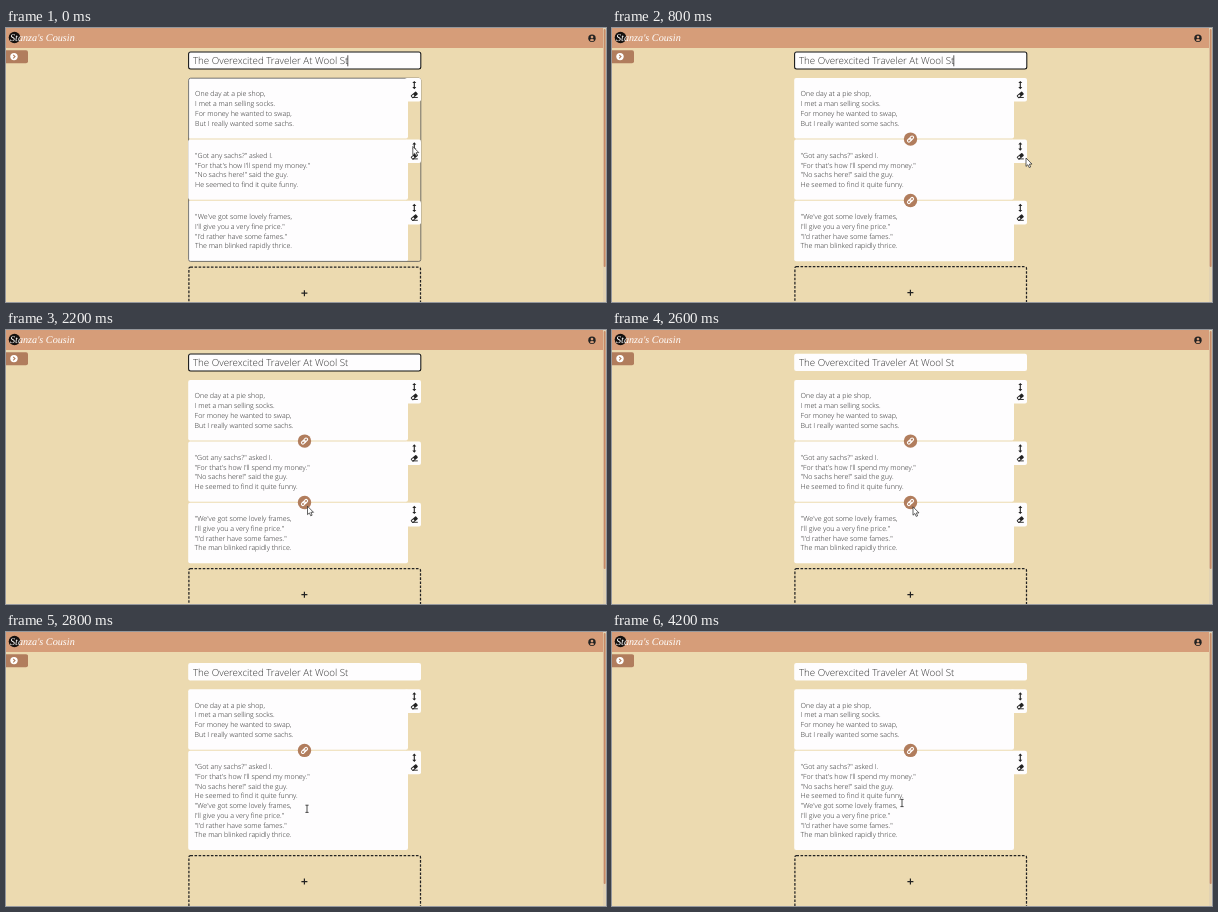
Recreate the animation shown at these times as an HTML page. Size 600 by 274 pixels, loop 4.3 s.

```html
<!DOCTYPE html>
<html lang="en">
<head>
<meta charset="utf-8">
<title>Poem cards</title>
<style>
  html, body { margin: 0; width: 100%; height: 100%; overflow: hidden; background: #ecdab0; }
  svg { display: block; width: 100%; height: 100%; }
  text { font-family: "Open Sans", sans-serif; font-weight: 300; text-rendering: geometricPrecision; white-space: pre; }
  .line { font-size: 7.06px; fill: #262626; }
  .title { font-size: 9.75px; fill: #333; }
  .brand { font: italic 400 10.2px "Liberation Serif", serif; fill: #fff; }
</style>
</head>
<body>
<svg id="stage" viewBox="0 0 600 274" preserveAspectRatio="none"></svg>
<script>
const LOOP = 4300, STEP = 100;
const PAPER = '#fefdfe', SAND = '#ecdab0', CLAY = '#d69d79', BROWN = '#b17d5d', INK = '#222';
const LEFT = 182.2, CARD_W = 219.8, RIGHT = 415, TOP = 57.3, LINE_H = 9.75, GAP = 1;

const poems = [
  ['One day at a pie shop,', 'I met a man selling socks.', 'For money he wanted to swap,', 'But I really wanted some sachs.'],
  ['"Got any sachs?" asked I.', '"For that\'s how I\'ll spend my money."', '"No sachs here!" said the guy.', 'He seemed to find it quite funny.'],
  ['"We\'ve got some lovely frames,', 'I\'ll give you a very fine price."', '"I\'d rather have some fames."', 'The man blinked rapidly thrice.']
];

const rect = (x, y, w, h, fill, more = '') =>
  `<rect x="${x}" y="${y}" width="${w}" height="${h}" fill="${fill}" ${more}/>`;
const group = (x, y, body) => `<g transform="translate(${x} ${y})">${body}</g>`;
const path = (d, stroke, w, more = '') =>
  `<path d="${d}" fill="none" stroke="${stroke}" stroke-width="${w}" ${more}/>`;

const moveIcon = path('M0-3V3', INK, 1.1) +
  `<path d="M-2-2L0-4.2L2-2ZM-2 2L0 4.2L2 2Z" fill="${INK}"/>`;
const eraserIcon = `<g transform="rotate(-40)">${rect(-3.5, -1.8, 7, 3.6, INK, 'rx=".8"')}${rect(-2.7, -.9, 2.2, 1.8, PAPER)}</g>` +
  path('M-1.8 2.6H3.5', INK, .9);
const linkIcon = `<circle r="6.7" fill="${BROWN}"/><g transform="rotate(-45)" fill="none" stroke="#fff" stroke-width="1.1">
  <rect x="-3.7" y="-1.4" width="4.4" height="2.8" rx="1.4"/><rect x="-.7" y="-1.4" width="4.4" height="2.8" rx="1.4"/></g>`;

const cardHeight = lines => lines.length * LINE_H + 21.4;

function card(lines, y, shift) {
  return rect(LEFT, y, CARD_W, cardHeight(lines), PAPER, 'rx="2"') + lines.map((s, i) =>
    `<text class="line" x="${188.6 + shift}" y="${y + 18.4 + i * LINE_H}">${s}</text>`).join('');
}

const tab = y =>
  rect(LEFT + CARD_W - 3, y, RIGHT - LEFT - CARD_W + 3, 23.6, PAPER, 'rx="2"') +
  group(408.3, y + 7.1, moveIcon) + group(408.3, y + 16.9, eraserIcon);

function addBox(y) {
  return rect(182.9, y + .7, 231.6, 52, 'none', `rx="1.5" stroke="${INK}" stroke-width="1.25" stroke-dasharray="2.6 1.5"`) +
    group(298.4, y + 26.7, path('M-3 0H3M0-3V3', INK, 1.2));
}

function stack(id, list, dragging = false) {
  const tops = [];
  let y = TOP;
  for (const lines of list) {
    tops.push(y);
    y += cardHeight(lines) + GAP;
  }
  const cards = list.map((lines, i) => card(lines, tops[i], dragging ? .5 : 0));
  const tabs = tops.map(tab).join('');
  let out;
  if (dragging) {
    // the held card lies above the outline of the drop zone
    const zone = [LEFT + .4, TOP + .2, RIGHT - LEFT - .6, y - TOP - GAP];
    out = rect(...zone, SAND, 'rx="2"') + cards[0] + cards[2] +
      rect(...zone, 'none', 'rx="2" stroke="#555" stroke-width=".8"') + cards[1] + tabs;
  } else {
    out = cards.join('') + tabs + tops.slice(1).map(top => group(298.5, top - .3, linkIcon)).join('');
  }
  return `<g id="${id}">${out}${addBox(y + (dragging ? 4.3 : 3.8))}</g>`;
}

const stage = document.getElementById('stage');
stage.innerHTML = rect(0, 0, 600, 274, SAND) +
  `<g id="page">
    ${rect(LEFT, 31, RIGHT - LEFT, 17.4, PAPER, 'rx="2"')}
    ${rect(LEFT + .4, 31.2, RIGHT - LEFT - .6, 17, 'none', 'id="focus" rx="2" stroke="#111" stroke-width="1.05"')}
    <text class="title" x="187" y="43.8">The Overexcited Traveler At Wool St</text>
    ${path('M341.8 34.6V45.6', '#222', .75, 'id="caret"')}
    ${stack('drag', poems, true)}
    ${stack('three', poems)}
    ${stack('two', poems.slice(0, 2))}
    ${stack('merged', [poems[0], poems[1].concat(poems[2])])}
  </g>` +
  rect(0, 0, 600, 20, CLAY) +
  `<circle cx="8.5" cy="9.5" r="5.8" fill="#15110f"/><text class="brand" x="4" y="13.2">Stanza's Cousin</text>` +
  `<g id="user"><circle r="3.7" fill="${INK}"/><circle cy="-1.1" r="1.35" fill="${CLAY}"/>
    <path d="M-2.2 2.1Q-1.9.7 0 .7T2.2 2.1Q0 3.8-2.2 2.1Z" fill="${CLAY}"/></g>` +
  rect(-3, 22.2, 25, 13, BROWN, 'rx="2"') +
  group(8, 28.6, '<circle r="3.7" fill="#fff"/>' + path('M-.8-1.8L1 0L-.8 1.8', BROWN, 1.1)) +
  `<g id="footer">${rect(0, 255, 600, 19, CLAY)}<circle cx="291.2" cy="266.8" r="6.1" fill="${INK}"/>${rect(304, 261, 11.2, 11.2, INK)}</g>` +
  `<g id="bar">${rect(597, 0, 3, 274, '#e2d2b3')}${rect(597.7, 1, 1.9, 238, '#c58a67', 'id="thumb" rx=".9"')}</g>` +
  `<g id="arrow"><path d="M0 0V8.4L1.9 6.7L3.2 9.6L4.6 9L3.4 6.1H6Z" fill="#fff" stroke="#222" stroke-width=".7"/></g>` +
  `<g id="beam">${path('M-1.6-3.6H1.6M0-3.6V3.6M-1.6 3.6H1.6', '#222', .8)}</g>`;

const el = {};
stage.querySelectorAll('[id]').forEach(e => { el[e.id] = e; });

// time, x, y of the pointer
const track = [
  [0, 406.8, 118.5], [100, 406.8, 118.5], [600, 414, 130], [1100, 414, 130],
  [1600, 307.8, 168.8], [1700, 307.8, 168.8], [2300, 301, 176.8],
  [4100, 301, 176.8], [4200, 290, 171]
];

function pointer(t) {
  const i = track.findIndex(k => k[0] >= t);
  if (i < 1) return track[i < 0 ? track.length - 1 : 0].slice(1);
  const [a, b] = [track[i - 1], track[i]];
  const p = (t - a[0]) / (b[0] - a[0]);
  const e = p * p * (3 - 2 * p);
  return [a[1] + (b[1] - a[1]) * e, a[2] + (b[2] - a[2]) * e];
}

const show = (e, on) => e.setAttribute('display', on ? 'inline' : 'none');
const place = (e, x, y) => e.setAttribute('transform', `translate(${x} ${y})`);

function draw(now) {
  const t = Math.floor(now % LOOP / STEP) * STEP;
  const short = t >= 2700 && t < 2800;
  const clicked = t >= 2700;
  const [x, y] = pointer(t);

  show(el.drag, t < 200);
  show(el.three, t >= 200 && !clicked);
  show(el.two, short);
  show(el.merged, t >= 2800);
  show(el.footer, short);
  show(el.bar, !short);
  el.thumb.setAttribute('height', clicked ? 251 : 238);
  place(el.page, short ? 1.5 : 0, clicked ? 0 : -7.3);
  place(el.user, short ? 589 : 586, 10.2);

  show(el.focus, t < 2500);
  show(el.caret, t < 2500 && (t < 200 || Math.floor((t - 200) / 500) % 2 === 1));

  show(el.arrow, !clicked);
  show(el.beam, clicked);
  place(clicked ? el.beam : el.arrow, x, y);
}

function tick() {
  draw(performance.now());
  requestAnimationFrame(tick);
}
tick();
</script>
</body>
</html>
```
